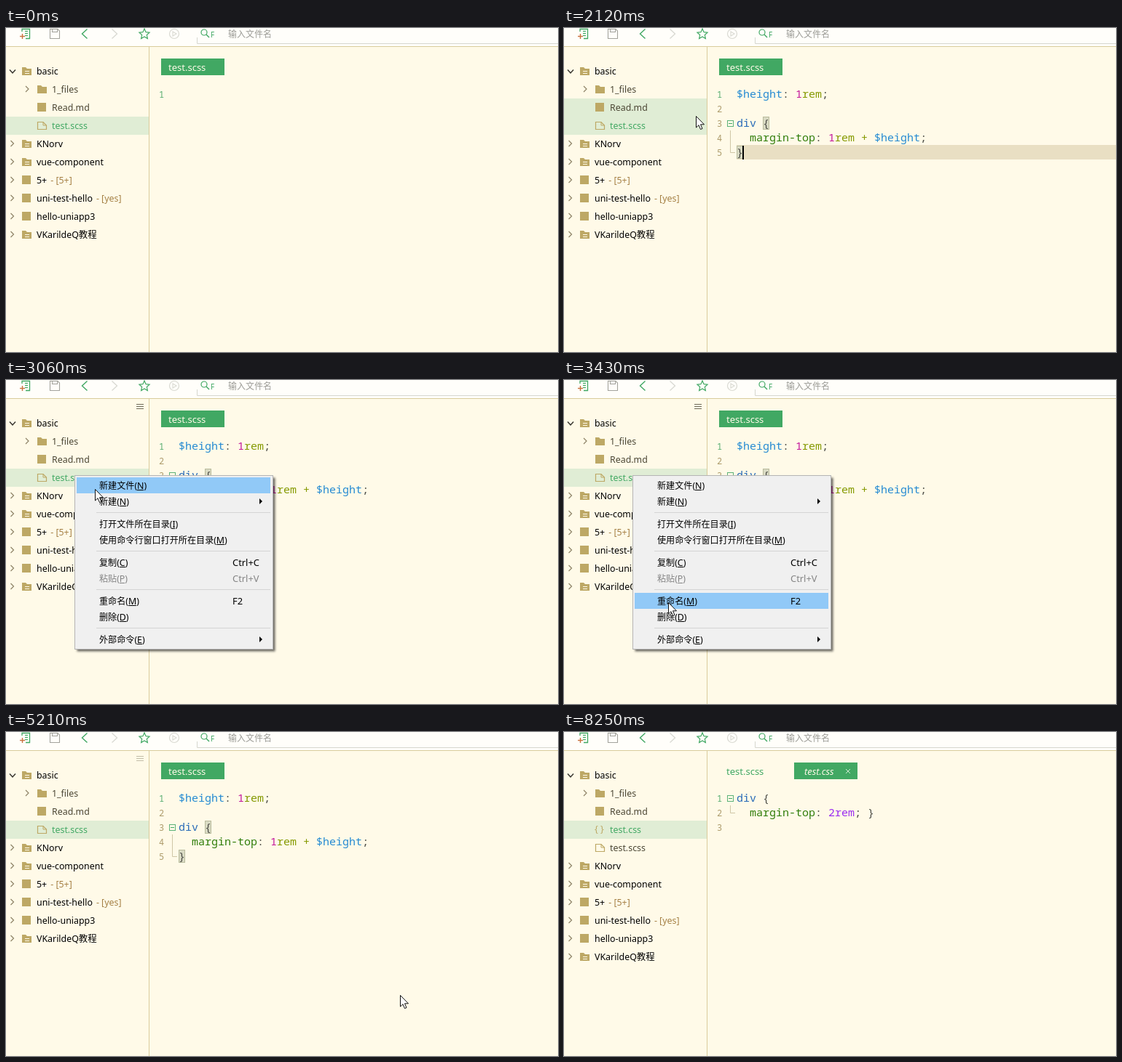
Animation of 758 by 446 pixels, one loop 9630 ms. Source, as an HTML page with a canvas:

```html
<!DOCTYPE html>
<html lang="zh-CN">
<head>
<meta charset="utf-8">
<title>SCSS</title>
<style>
html, body { margin: 0; width: 100%; height: 100%; overflow: hidden; background: #fffae8; }
canvas { display: block; width: 758px; height: 446px; }
</style>
</head>
<body>
<canvas id="stage" width="758" height="446"></canvas>
<script>
const ctx = document.getElementById('stage').getContext('2d');
const LOOP = 9630;
const BG = '#fffae8', GREEN = '#41a863', GOLD = '#bda865', EDGE = '#d9cc9c', SELECTED = '#e0edd5';
const BLUE = '#268bd2', TAG = '#2a6cb8', PROP = '#2f7d0a', NUM = '#c3149a', OLIVE = '#859900',
      VALUE = '#9a2cf0', DARK = '#4c4c46';
const SANS = '"Noto Sans", "Open Sans", "Noto Sans CJK SC", "Noto Sans CJK", sans-serif';
const MONO = '"Noto Sans Mono", "DejaVu Sans Mono", monospace';

function rect(x, y, w, h, color) {
  ctx.fillStyle = color;
  ctx.fillRect(x, y, w, h);
}

function frame(x, y, w, h, color) {
  ctx.strokeStyle = color;
  ctx.lineWidth = 1;
  ctx.strokeRect(x + .5, y + .5, w - 1, h - 1);
}

function line(points, color, width = 1, close = false) {
  ctx.beginPath();
  points.forEach(([x, y]) => ctx.lineTo(x, y));
  if (close) ctx.closePath();
  ctx.strokeStyle = color;
  ctx.lineWidth = width;
  ctx.stroke();
}

function poly(points, color) {
  ctx.beginPath();
  points.forEach(([x, y]) => ctx.lineTo(x, y));
  ctx.fillStyle = color;
  ctx.fill();
}

function circle(x, y, r, color) {
  ctx.beginPath();
  ctx.arc(x, y, r, 0, Math.PI * 2);
  ctx.strokeStyle = color;
  ctx.lineWidth = 1.2;
  ctx.stroke();
}

// Draws text centred on y and returns its width.
function text(str, x, y, color, size = 12.4, family = SANS, style = '') {
  ctx.font = `${style} ${size}px ${family}`;
  ctx.fillStyle = color;
  ctx.fillText(str, x, Math.round(y + size * .4));
  return ctx.measureText(str).width;
}

function toolbar(t) {
  rect(0, 0, 758, 25, '#fffefa');
  rect(0, 25, 758, 1, EDGE);
  // new file
  line([[22, 5], [22, 1.5], [32.5, 1.5], [32.5, 14.5], [27, 14.5]], GREEN, 1.3);
  [4.5, 7.5, 10.5].forEach(y => line([[26, y], [30, y]], GREEN, 1.2));
  line([[19, 11.5], [26, 11.5]], '#c8713d', 1.4);
  line([[22.5, 8], [22.5, 15]], '#c8713d', 1.4);
  // save
  const save = t >= 1150 && t < 1960 ? GREEN : '#a3a39d';
  line([[60.5, 1.5], [71, 1.5], [73.5, 4], [73.5, 14.5], [60.5, 14.5]], save, 1.1, true);
  line([[63.5, 1.5], [63.5, 5.5], [70.5, 5.5], [70.5, 1.5]], save, 1.1);
  // navigation
  line([[111.5, 1.5], [104.5, 8], [111.5, 14.5]], GREEN, 1.4);
  line([[145.5, 1.5], [152.5, 8], [145.5, 14.5]], '#d9d9d2', 1.3);
  const star = Array.from({ length: 10 }, (_, i) => {
    const a = i * Math.PI / 5 - Math.PI / 2, r = i % 2 ? 3.5 : 7.4;
    return [190 + r * Math.cos(a), 8.5 + r * Math.sin(a)];
  });
  line(star, GREEN, 1.2, true);
  circle(231, 8, 6.5, '#d9d9d2');
  line([[229, 5], [234, 8], [229, 11]], '#d9d9d2', 1.1, true);
  // search
  circle(272, 6, 4, GREEN);
  line([[275, 9], [279, 13]], GREEN, 1.4);
  text('F', 281, 9, GREEN, 10);
  text('输入文件名', 305, 8, '#9b9b96', 12);
  line([[262.5, 13], [262.5, 21.5], [758, 21.5]], '#d6d6ce');
}

function icon(kind, x, y) {
  if (kind === 'project' || kind === 'folder') {
    poly([[x, y - 5], [x + 5, y - 5], [x + 7, y - 3], [x + 13, y - 3], [x + 13, y + 6], [x, y + 6]], GOLD);
    if (kind === 'project') {
      rect(x + 4, y, 6, 1, BG);
      rect(x + 4, y + 3, 6, 1, BG);
    }
  } else if (kind === 'square') {
    rect(x, y - 6, 12, 12, GOLD);
  } else if (kind === 'css') {
    text('{ }', x - 1, y - 1, GOLD, 12.5);
  } else {
    line([[x + .5, y - 4.5], [x + 8, y - 4.5], [x + 12.5, y], [x + 12.5, y + 5.5], [x + .5, y + 5.5]], GOLD, 1.2, true);
    line([[x + 8, y - 4.5], [x + 8, y], [x + 12.5, y]], GOLD);
  }
}

const CHILDREN = [['folder', '1_files'], ['square', 'Read.md'], ['css', 'test.css'], ['file', 'test.scss']];
const PROJECTS = [['project', 'KNorv'], ['project', 'vue-component'], ['square', '5+', '[5+]'],
  ['square', 'uni-test-hello', '[yes]'], ['square', 'hello-uniapp3'], ['project', 'VKarildeQ教程']];

function chevron(x, y) {
  line([[x, y - 4], [x + 4, y], [x, y + 4]], '#8f8468', 1.2);
}

function sidebar(t, p) {
  rect(196, 26, 1, 420, EDGE);
  const compiled = t >= 5740;
  const files = CHILDREN.filter(c => compiled || c[0] !== 'css');
  const hovering = p && p.x < 196 && (t < 2590 || t > 6220) ? Math.floor((p.y - 47) / 25) : -1;
  [3, hovering].forEach(i => i >= 0 && rect(0, 47 + i * 25, 196, 25, SELECTED));

  line([[5, 57.5], [9, 62], [13, 57.5]], '#33312b', 1.4);
  icon('project', 22, 59);
  text('basic', 42, 59, '#000');
  files.forEach(([kind, name], i) => {
    const y = 84 + i * 25;
    if (kind === 'folder') chevron(27, y);
    icon(kind, 43, y);
    text(name, 63, y, i === 2 ? GREEN : '#4b4634');
  });
  PROJECTS.forEach(([kind, name, tag], i) => {
    const y = 84 + (files.length + i) * 25;
    chevron(6.5, y);
    icon(kind, 22, y);
    const w = text(name, 42, y, '#000');
    if (tag) text('- ' + tag, 42 + w + 5, y, '#a58045');
  });

  const bright = t >= 2190 && t < 5130;
  const dim = t >= 5130 && t < 5740 || t >= 6450 && t < 7930;
  if (bright || dim)
    [33, 36, 39].forEach(y => rect(179, y, 10, 1, bright ? '#6f6a58' : '#c3bda8'));
}

const SCSS = [
  [['$height', BLUE], [': ', DARK], ['1', NUM], ['rem', OLIVE], [';', DARK]],
  [],
  [['div ', TAG], ['{', DARK]],
  [['  margin-top', PROP], [': ', DARK], ['1', NUM], ['rem + ', OLIVE], ['$height', BLUE], [';', DARK]],
  [['}', DARK]]
];
const CSS = [
  [['div ', TAG], ['{', DARK]],
  [['  margin-top', PROP], [': ', DARK], ['2rem', VALUE], ['; }', DARK]],
  []
];

function fold(y, h) {
  frame(224, y - 4, 9, 9, '#5cb278');
  rect(226, y, 5, 1, GREEN);
  line([[228.5, y + 10], [228.5, y + h + .5], [235, y + h + .5]], '#cfc6a6');
}

function bracket(x, y) {
  rect(x, y, 9, 18, '#dadbc4');
  frame(x, y, 9, 18, '#b9bb9d');
}

function editor(t) {
  const opened = t >= 7100;
  if (opened) {
    text('test.scss', 223, 54, GREEN, 13);
    rect(316, 42, 87, 23, GREEN);
    text('test.css', 330, 54, BG, 12.8, SANS, 'italic');
    line([[387, 51], [393, 57]], '#cfe9d2');
    line([[393, 51], [387, 57]], '#cfe9d2');
  } else {
    rect(213, 42, 87, 23, GREEN);
    text('test.scss', 223, 54, BG, 13);
  }

  const pasted = t >= 1150;
  const code = opened ? CSS : pasted ? SCSS : [[]];
  const focus = t >= 830 && t < 2590;
  const top = pasted ? 161 : 81;
  if (focus) rect(237, top, 521, 20, '#e9dfc3');
  if (!opened && t >= 1240) {
    bracket(273, 122);
    bracket(237, 162);
  }
  code.forEach((tokens, i) => {
    const y = 91 + i * 20;
    text(String(i + 1), 210, y, i ? '#ae9c6c' : '#58ad70', 12, MONO);
    let x = 237;
    tokens.forEach(([str, color]) => { x += text(str, x, y - 1, color, 15, MONO); });
  });
  if (focus) rect(pasted ? 245 : 237, top + 1, 2, 19, '#000');
  if (opened) fold(91, 20);
  else if (t >= 1550) fold(131, 40);
}

// "&" marks the underlined letter of a label.
function label(str, x, y, color) {
  const [head, rest] = str.split('&');
  if (head) x += text(head, x, y, color, 12.1);
  if (!rest) return;
  const w = text(rest[0], x, y, color, 12.4);
  rect(Math.round(x), y + 6, Math.round(w), 1, color);
  text(rest.slice(1), x + w, y, color, 12.4);
}

function panel(x, y, w, h) {
  // The shadow is kept outside the panel so that it stays clean while fading in.
  ctx.save();
  ctx.beginPath();
  ctx.rect(0, 0, 758, 446);
  ctx.rect(x, y, w, h);
  ctx.clip('evenodd');
  ctx.shadowColor = 'rgba(0,0,0,.6)';
  ctx.shadowBlur = 3;
  ctx.shadowOffsetX = ctx.shadowOffsetY = 2.5;
  rect(x, y, w, h, '#f0f0f0');
  ctx.restore();
  rect(x, y, w, h, '#f0f0f0');
  frame(x, y, w, h, '#b4b4b4');
}

function menu(x, y, w, h, items, rules, active) {
  panel(x, y, w, h);
  items.forEach(([str, cy, extra, off], i) => {
    if (i === active) rect(x + 3, cy - 11, w - 7, 22, '#91c9f7');
    const color = off ? '#858585' : '#000';
    label(str, x + 34, cy, color);
    if (extra === '>') poly([[x + w - 19, cy - 4], [x + w - 15, cy], [x + w - 19, cy + 4]], '#000');
    else if (extra) text(extra, 311, cy, color, 12.9);
  });
  rules.forEach(ry => rect(x + 30, ry, w - 34, 1, '#d4d4d4'));
}

const MAIN = [['新建文件(&N)', 145], ['新建(&N)', 167, '>'], ['打开文件所在目录(&I)', 198],
  ['使用命令行窗口打开所在目录(&M)', 220], ['复制(&C)', 251, 'Ctrl+C'], ['粘贴(&P)', 273, 'Ctrl+V', true],
  ['重命名(&M)', 304, 'F2'], ['删除(&D)', 326], ['外部命令(&E)', 357, '>']];
const TOOLS = [['sass', 360, '>'], ['自定义外部命令(&E)', 391]];
const TASKS = [['&1 编译scss/sass', 363], ['插件配置(&C)', 394]];

function menus(t, p) {
  if (t < 2590 || t >= 5050) return;
  const hit = p.x > 96 ? MAIN.findIndex(m => Math.abs(m[1] - p.y) <= 11) : -1;
  menu(94, 131, 273, 240, MAIN, [182, 235, 288, 341], hit);
  if (t < 3720) return;
  menu(361, 346, 157, 59, TOOLS, [376], p.x > 363 ? 0 : -1);
  if (t < 3820) return;
  ctx.globalAlpha = Math.min(1, (t - 3820) / 200);
  menu(513, 349, 147, 58, TASKS, [378], p.x > 516 ? 0 : -1);
  ctx.globalAlpha = 1;
}

const PATH = [[70, 746, 340], [700, 243, 88], [1550, 243, 88], [1700, 250, 100], [1960, 240, 108],
  [2120, 181, 121], [2420, 94, 131], [2590, 94, 131], [3060, 122, 150], [3520, 150, 355], [3580, 150, 355],
  [3850, 390, 356], [3970, 397, 357], [4500, 528, 362], [4580, 528, 362], [4750, 541, 362], [6220, 541, 362],
  [6530, 100, 158], [6760, 78, 134], [7930, 78, 134], [8240, 620, 432]];

// The pointer advances in short hops rather than continuously.
function pointer(t) {
  const i = PATH.findIndex((k, n) => n + 1 < PATH.length && t >= k[0] && t < PATH[n + 1][0]);
  if (i < 0) return null;
  const [t0, x0, y0] = PATH[i], [t1, x1, y1] = PATH[i + 1];
  const f = Math.floor((t - t0) / 70) * 70 / (t1 - t0);
  return { x: Math.round(x0 + (x1 - x0) * f), y: Math.round(y0 + (y1 - y0) * f) };
}

function drawPointer(t, p) {
  if (!p) return;
  ctx.save();
  ctx.translate(p.x, p.y);
  const arrow = p.x < 197 || t >= 2590 && t < 6290;
  if (arrow) {
    const shape = [[.5, .5], [.5, 16], [4, 12.7], [6.5, 18.5], [9, 17.5], [6.5, 11.8], [11.5, 11.8]];
    poly(shape, '#fff');
    line(shape, '#111', 1, true);
  } else {
    rect(0, -8, 1, 16, '#222');
    rect(-3, -8, 7, 1, '#222');
    rect(-3, 7, 7, 1, '#222');
  }
  ctx.restore();
}

function draw(now) {
  const t = now % LOOP;
  const p = pointer(t);
  rect(0, 0, 758, 446, BG);
  toolbar(t);
  sidebar(t, p);
  editor(t);
  menus(t, p);
  drawPointer(t, p);
}

let start;
function tick(now) {
  start ??= now;
  draw(now - start);
  requestAnimationFrame(tick);
}
draw(0);
requestAnimationFrame(tick);
</script>
</body>
</html>
```
